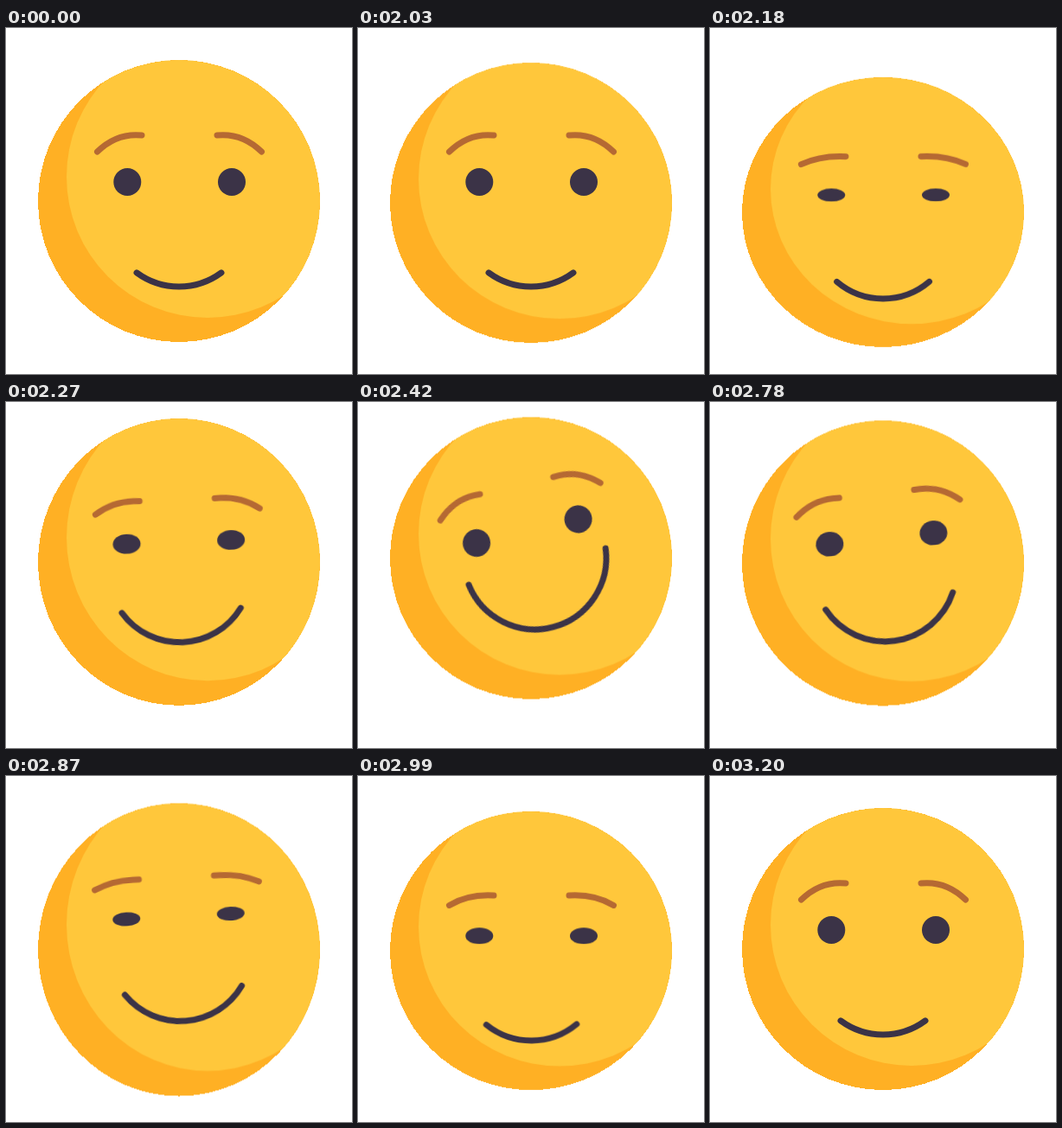
Animation, 400 px wide and 400 px high, one loop 3.83 s. Source, as an HTML page without scripts:

```html
<!DOCTYPE html>
<html lang="en">
<head>
<meta charset="utf-8">
<title>Happy hop</title>
<style>
  html, body { margin: 0; width: 100%; height: 100%; overflow: hidden; background: #fff; }
  svg { display: block; width: 100%; height: 100%; }

  .head, .looks, .smile, .squint { animation: 3830ms linear infinite; }
  .head { animation-name: hop; transform-origin: 200px 200px; }
  .looks { animation-name: look; transform-origin: 200px 199px; }
  .smile { animation-name: tilt; transform-origin: 200px 199px; }
  .squint { animation-name: squint; }
  .eyes { fill: #3b3347; transform-origin: 200px 178px; }
  .brows { stroke: #b56933; transform-origin: 200px 142px; }
  .brows, .mouth { fill: none; stroke-width: 7; stroke-linecap: round; }
  .mouth {
    stroke: #3b3347;
    stroke-dasharray: 72.8 360;
    stroke-dashoffset: -53.6;
    animation: grin 3830ms linear infinite;
  }

  /* squash, leap, hang, land, settle */
  @keyframes hop {
    0%, 52.98% { transform: translateY(0) scaleY(1); }
    53% { transform: translateY(2px) scaleY(.994); animation-timing-function: cubic-bezier(.3, .3, .6, 1); }
    56.1% { transform: translateY(16px) scaleY(.95); animation-timing-function: cubic-bezier(.5, 0, .6, .9); }
    59.27% { transform: translateY(-15px) scaleY(1.018); animation-timing-function: ease-out; }
    62.6%, 70.5% { transform: translateY(-19.5px) scaleY(1); animation-timing-function: ease-in; }
    74.93% { transform: translateY(.5px) scaleY(1.04); }
    76.5% { transform: translateY(14px) scaleY(.963); }
    78.07% { transform: translateY(2px) scaleY(.988); animation-timing-function: ease-out; }
    80.9% { transform: translateY(-1.5px) scaleY(1.009); animation-timing-function: ease-in-out; }
    83.55%, 100% { transform: translateY(0) scaleY(1); }
  }

  @keyframes look {
    0%, 53% { transform: translateY(0) rotate(0deg); animation-timing-function: ease-in-out; }
    56.5% { transform: translateY(16px) rotate(0deg); animation-timing-function: cubic-bezier(.5, 0, .7, .8); }
    59.27% { transform: translateY(-16px) rotate(-2.1deg); animation-timing-function: ease-out; }
    64.5% { transform: translateY(-30.5px) rotate(-14.3deg); }
    68.67% { transform: translateY(-30.5px) rotate(-13.9deg); animation-timing-function: ease-in-out; }
    74.93% { transform: translateY(-16px) rotate(-3.1deg); }
    77% { transform: translateY(13px) rotate(0deg); }
    78.07% { transform: translateY(7px) rotate(0deg); animation-timing-function: ease-out; }
    80.9% { transform: translateY(-2px) rotate(0deg); animation-timing-function: ease-in-out; }
    83.55%, 100% { transform: translateY(0) rotate(0deg); }
  }

  @keyframes tilt {
    0%, 53% { transform: translateY(0) rotate(0deg); animation-timing-function: ease-in-out; }
    56.5% { transform: translateY(15px) rotate(0deg); animation-timing-function: cubic-bezier(.5, 0, .7, .8); }
    59.27% { transform: translateY(-21px) rotate(-2.3deg); animation-timing-function: ease-out; }
    64.5% { transform: translateY(-37px) rotate(-16.2deg); }
    68.67% { transform: translateY(-37px) rotate(-15.8deg); animation-timing-function: ease-in-out; }
    74.93% { transform: translateY(-16px) rotate(-4.5deg); }
    77% { transform: translateY(13px) rotate(-.5deg); }
    78.07% { transform: translateY(7px) rotate(-.4deg); animation-timing-function: ease-out; }
    80.9% { transform: translateY(-2px) rotate(0deg); animation-timing-function: ease-in-out; }
    83.55%, 100% { transform: translateY(0) rotate(0deg); }
  }

  /* dash units are degrees of the half circle */
  @keyframes grin {
    0%, 55.5% { stroke-dasharray: 72.8 360; stroke-dashoffset: -53.6; animation-timing-function: ease-in; }
    59.27% { stroke-dasharray: 112.4 360; stroke-dashoffset: -33.8; animation-timing-function: ease-out; }
    64.5%, 68.67% { stroke-dasharray: 171 360; stroke-dashoffset: -4.5; animation-timing-function: ease-in-out; }
    74.93% { stroke-dasharray: 110.8 360; stroke-dashoffset: -34.6; }
    78.07% { stroke-dasharray: 78.6 360; stroke-dashoffset: -50.7; animation-timing-function: ease-out; }
    80.9%, 100% { stroke-dasharray: 72.8 360; stroke-dashoffset: -53.6; }
  }

  @keyframes squint {
    0%, 53% { transform: scaleY(1); animation-timing-function: ease-in-out; }
    56.7% { transform: scaleY(.45); }
    59.27% { transform: scaleY(.71); animation-timing-function: ease-out; }
    62%, 71% { transform: scaleY(1); animation-timing-function: ease-in; }
    74.93% { transform: scaleY(.51); animation-timing-function: ease-out; }
    76.5% { transform: scaleY(.4); }
    78.07% { transform: scaleY(.59); animation-timing-function: ease-out; }
    81%, 100% { transform: scaleY(1); }
  }
</style>
</head>
<body>
<svg viewBox="0 0 400 400">
  <clipPath id="disc"><circle cx="200" cy="200" r="163"/></clipPath>
  <g class="head">
    <circle cx="200" cy="200" r="163" fill="#ffb024" shape-rendering="crispEdges"/>
    <circle cx="233" cy="172" r="163" fill="#ffc73b" clip-path="url(#disc)"/>
  </g>
  <g class="looks">
    <path class="brows squint" vector-effect="non-scaling-stroke" d="M105.5 143Q128 121 157 124M295.5 143Q273 121 244 124"/>
    <g class="eyes squint">
      <circle cx="140.3" cy="178" r="16"/>
      <circle cx="261" cy="178" r="16"/>
    </g>
  </g>
  <g class="smile">
    <path class="mouth" pathLength="180" d="M117.5 216.5A82.5 82.5 0 0 0 282.5 216.5"/>
  </g>
</svg>
</body>
</html>
```
